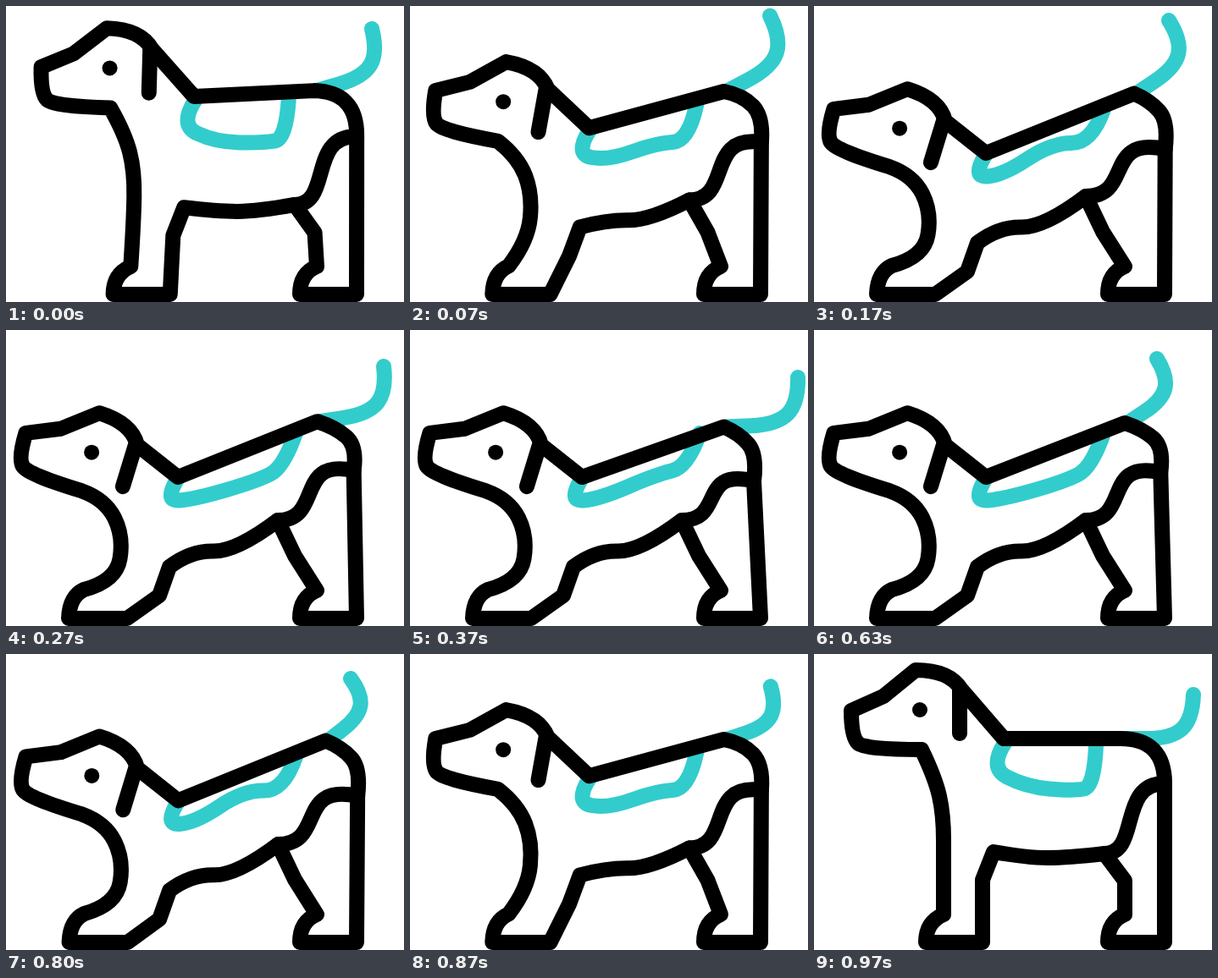
An HTML page for the animation above (1.67 s loop, 470 px wide and 350 px high).

```html
<!DOCTYPE html>
<html lang="en">
<head>
<meta charset="utf-8">
<title>Playful dog</title>
<style>
  html, body { margin: 0; width: 100%; height: 100%; overflow: hidden; background: #fff; }
  svg { display: block; width: 100vw; height: 100vh; }
  path { fill: none; stroke: #000; stroke-width: 18; stroke-linecap: round; stroke-linejoin: round; }
  .teal { stroke: #33cccc; }
</style>
</head>
<body>
<svg viewBox="0 0 470 350">
  <path id="tail" class="teal"/>
  <path id="saddle" class="teal"/>
  <path id="haunch"/>
  <path id="body"/>
  <path id="ear"/>
  <circle id="eye" r="9"/>
</svg>
<script>
const LOOP = 1670, STEP = 100 / 3;
const REST = 29, MIDDLE = 14; // steps: standing again, deepest bow

const el = id => document.getElementById(id);
const lerp = (a, b, u) => a + (b - a) * u;
const smooth = u => { u = Math.min(1, Math.max(0, u)); return u * u * (3 - 2 * u); };
const soft = ([x, y]) => [x, y, true];

// Spline through rows of [time, ...values], still at both ends.
function spline(keys, t) {
  let i = 0;
  while (i < keys.length - 2 && t >= keys[i + 1][0]) i++;
  const a = keys[i], b = keys[i + 1], span = b[0] - a[0], u = (t - a[0]) / span;
  const slope = (k, j) => {
    const p = keys[k - 1], q = keys[k + 1];
    return p && q ? (q[j] - p[j]) / (q[0] - p[0]) * span : 0;
  };
  return a.map((v, j) => lerp(v, b[j], smooth(u))
    + u * (1 - u) * ((1 - u) * slope(i, j) - u * slope(i + 1, j))).slice(1);
}

// Lines through the plain points, curves pulled by the soft ones.
function draw(id, points) {
  const d = points.map(([x, y, isSoft], i) => {
    if (!isSoft) return `${i ? 'L' : 'M'}${x} ${y}`;
    const [nx, ny, nextSoft] = points[i + 1];
    const end = nextSoft ? [(x + nx) / 2, (y + ny) / 2] : [nx, ny];
    return `Q${x} ${y} ${end.join(' ')}`;
  });
  el(id).setAttribute('d', d.join(''));
}

// The head is rigid: it drops and turns about the top of the ear.
const nape = [174, 42];
function headPoint([x, y], bow) {
  const turn = 17 * bow * Math.PI / 180, c = Math.cos(turn), s = Math.sin(turn);
  const dx = x - nape[0], dy = y - nape[1];
  return [lerp(nape[0], 155, bow) + dx * c - dy * s, lerp(nape[1], 136, bow) + dx * s + dy * c];
}

// Joints: standing x, y, then bowing x, y.
const joints = {
  shoulder: [224, 100, 203, 174],
  throat: [143, 146, 117, 200],
  chest: [153, 190, 139, 244],
  shin: [153, 250, 130, 297],
  ankle: [153, 308, 92, 307],
  instep: [132, 317, 75, 315],
  toe: [132, 341, 74, 341],
  heel: [199, 341, 143, 341],
  elbow: [199, 267, 181, 314],
  armpit: [212, 234, 193, 280],
  ribs: [252, 241, 218, 261],
  belly: [300, 241, 272, 262],
  groin: [343, 236, 321, 225],
  knee: [367, 268, 341, 267]
};
const saddle = [
  [226, 104, 203, 175], [206, 134, 186, 203], [250, 157, 223, 200],
  [306, 162, 298, 179], [331, 157, 328, 162], [333, 108, 342, 122]
];

// Steps from the middle, hip x, y, rump x, y, saddle squeeze.
const hindKeys = [
  [0, 376, 119, 403, 190, 1],
  [5.5, 367, 109, 410, 167, 0],
  [9.5, 378, 103, 415, 169, 1],
  [15, 362, 100, 414, 153, 0]
];

// Step, tail tip x, y.
const tipKeys = [
  [-1, 448, 48], [0, 432, 27], [2.5, 424, 10], [5, 419, 17], [8, 446, 43],
  [10.5, 460, 56], [14, 433, 48], [19, 405, 34], [21.5, 402, 20], [24, 407, 29], [REST, 448, 48]
];

// The curled tail is turned and scaled to reach from root to tip.
function tailPoints([rx, ry], [tx, ty]) {
  const reach = [83, -52], size = reach[0] ** 2 + reach[1] ** 2;
  const vx = tx - rx, vy = ty - ry;
  const a = (vx * reach[0] + vy * reach[1]) / size, b = (vy * reach[0] - vx * reach[1]) / size;
  const place = ([x, y]) => [rx + x * a - y * b, ry + x * b + y * a];
  return [[rx, ry], place([28, 0]), soft(place([57, 0])), soft(place([82, -23])), [tx, ty]];
}

function render(ms) {
  const t = Math.min(REST, Math.floor((ms + 3.5) / STEP));
  const fromMiddle = Math.abs(t - MIDDLE);
  const bow = smooth((15 - fromMiddle) / 5.3);
  const blend = ([x, y, bx, by]) => [lerp(x, bx, bow), lerp(y, by, bow)];
  const at = name => blend(joints[name]);
  const head = (x, y) => headPoint([x, y], bow);

  const [hx, hy, ex, ey, squeeze] = spline(hindKeys, fromMiddle);
  const dx = ex - hx, dy = ey - hy;

  draw('tail', tailPoints([hx + 3, hy], spline(tipKeys, t)));

  const pad = saddle.map(blend);
  pad[3] = pad[3].map(v => v - 18 * squeeze);
  draw('saddle', pad.map((p, i) => i % 5 ? soft(p) : p));

  const [gx, gy] = at('groin'), width = ex - gx;
  el('haunch').setAttribute('d',
    `M${gx} ${gy}C${gx + 0.6 * width} ${gy} ${ex - 0.78 * width} ${ey - 16 * bow} ${ex} ${ey}`);

  draw('body', [
    [gx, gy], at('knee'), [367, 308], soft([347, 316]), [347, 341], [414, 341], [ex, ey],
    soft([ex + 4 * bow, ey - dy / 2]), soft([hx + dx / 2, hy + 0.12 * dy * bow]), [hx, hy],
    at('shoulder'), head(...nape), soft(head(160, 19)), head(120, 19), head(82, 50), head(44, 67),
    soft(head(44, 98)), soft(head(60, 113)), head(127, 113),
    soft(at('throat')), soft(at('chest')), soft(at('shin')), at('ankle'),
    soft(at('instep')), at('toe'), at('heel'), at('elbow'), at('armpit'),
    soft(at('ribs')), soft(at('belly')), [gx, gy]
  ]);

  draw('ear', [head(172, 42), head(172, 94)]);
  const [x, y] = head(125, 66);
  el('eye').setAttribute('cx', x);
  el('eye').setAttribute('cy', y);
}

const start = performance.now();
function tick(now) {
  render(Math.max(0, now - start) % LOOP);
  requestAnimationFrame(tick);
}
render(0);
requestAnimationFrame(tick);
</script>
</body>
</html>
```
